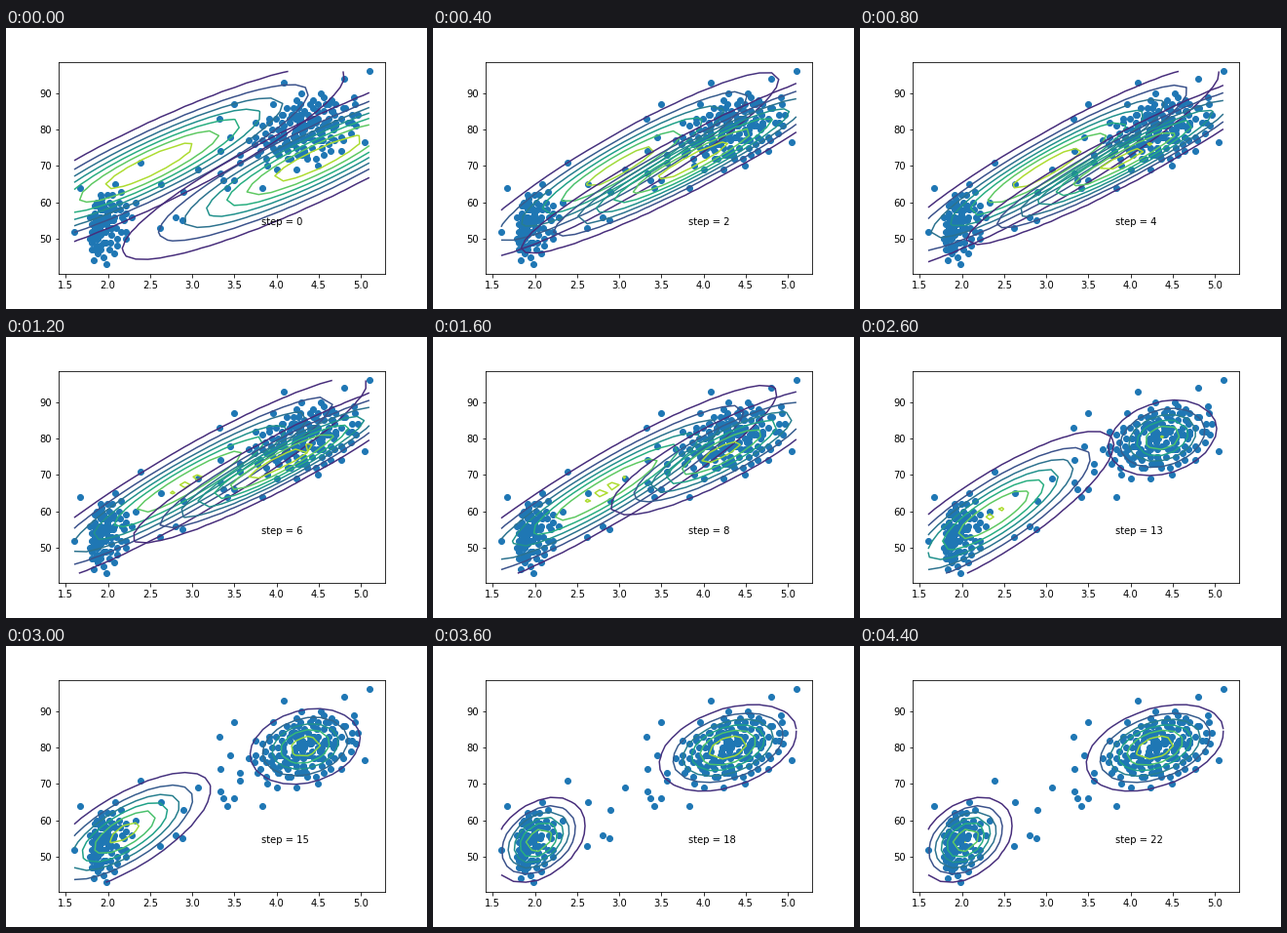
A matplotlib script that plays this animation: 432x288 px, repeating every 4.6 s.

```python
import numpy as np
import matplotlib.pyplot as plt
from matplotlib.animation import FuncAnimation

STEPS = 23
INTERVAL = 200
X_RANGE = (1.6, 5.1)
Y_RANGE = (43, 96)
GOLDEN_ANGLE = np.pi * (3 - np.sqrt(5))

# stray points between and beyond the two clusters
STRAYS = [
    (2.383, 71), (2.617, 53), (2.633, 65), (2.8, 56), (2.883, 55), (2.9, 63),
    (3.067, 69), (3.317, 83), (3.333, 74), (3.333, 68), (3.367, 66),
    (3.417, 64), (3.45, 78), (3.5, 66), (3.5, 87), (3.567, 73), (3.567, 71),
    (3.833, 64), (1.6, 52), (1.667, 64), (1.983, 43), (4.083, 93),
    (4.8, 94), (5.05, 76.5), (5.1, 96),
]

# the fit starts as two equal Gaussians, one unit either side of the data mean
MEAN = np.array([3.488, 70.9])
START = [(*(MEAN + shift), 1.303, 13.98, 184.8) for shift in (-1, 1)]

# key poses by step: (mean x, mean y, var x, cov, var y), left then right
POSES = {
    0: START,
    2: [(3.035, 70.0, 0.912, 11.7, 175), (3.87, 71.4, 1.01, 12.0, 159)],
    6: [(2.966, 68.0, 1.124, 14.5, 214), (4.05, 73.6, 0.748, 8.9, 121)],
    11: [(2.558, 61.9, 0.766, 10.7, 185.5), (4.4, 79.9, 0.108, 0.53, 28.8)],
    15: [(2.2, 56.7, 0.279, 3.25, 72.5), (4.34, 80.3, 0.119, 0.42, 30.3)],
    18: [(2.045, 54.6, 0.075, 0.57, 34.6), (4.29, 79.97, 0.17, 0.94, 36)],
}


def monotone_slopes(t, v):
    d = np.diff(v, axis=0) / np.diff(t)[:, None]
    a, b = d[:-1], d[1:]
    same = a * b > 0
    inner = np.where(same, 2 * a * b / np.where(same, a + b, 1), 0)
    return np.vstack([d[:1], inner, np.zeros_like(d[:1])])


TIMES = np.array(list(POSES), float)
VALUES = np.array([np.ravel(p) for p in POSES.values()])
SLOPES = monotone_slopes(TIMES, VALUES)


def fit(step):
    """Both Gaussians at a step, eased between key poses, then at rest."""
    step = min(step, TIMES[-1])
    k = min(np.searchsorted(TIMES, step, side="right"), len(TIMES) - 1) - 1
    h = TIMES[k + 1] - TIMES[k]
    s = (step - TIMES[k]) / h
    p = ((1 + 2 * s) * (1 - s) ** 2 * VALUES[k]
         + s * (1 - s) ** 2 * h * SLOPES[k]
         + s**2 * (3 - 2 * s) * VALUES[k + 1]
         + s**2 * (s - 1) * h * SLOPES[k + 1])
    return p.reshape(2, 5)


def density(x, y, mx, my, vx, cov, vy):
    det = vx * vy - cov**2
    dx, dy = x - mx, y - my
    q = (vy * dx**2 - 2 * cov * dx * dy + vx * dy**2) / det
    return np.exp(-q / 2) / (2 * np.pi * np.sqrt(det))


def blob(n, rho, reach):
    """Evenly spread normal cloud: a jittered sunflower cut off at reach."""
    i = np.arange(n) + 0.5
    r = np.sqrt(-2 * np.log(1 - i / n * (1 - np.exp(-reach**2 / 2))))
    u = r * np.cos(i * GOLDEN_ANGLE) + rng.normal(0, 0.1, n)
    v = r * np.sin(i * GOLDEN_ANGLE) + rng.normal(0, 0.1, n)
    return u, rho * u + np.sqrt(1 - rho**2) * v


rng = np.random.default_rng(7)
u, v = blob(90, 0.3, 2.0)
short = np.column_stack([1.65 + 0.3 * np.exp(0.45 * u), np.round(54 + 5.4 * v)])
u, v = blob(157, 0.35, 2.0)
long = np.column_stack([4.33 + 0.35 * u, np.round(80 + 5.7 * v)])
points = np.vstack([STRAYS, short, long])

fig, ax = plt.subplots(figsize=(6, 4), dpi=72)
fig.subplots_adjust(left=0.125, right=0.9, bottom=0.125, top=0.88)
ax.scatter(*points.T, color="C0", zorder=1)
ax.set_xlim(1.4153, 5.2847)
ax.set_ylim(40.35, 98.65)
label = ax.text(0.62, 0.23, "", transform=ax.transAxes)

gx, gy = np.meshgrid(np.linspace(*X_RANGE, 25), np.linspace(*Y_RANGE, 25))
contours = []


def draw(step):
    while contours:
        contours.pop().remove()
    for gauss in fit(step):
        z = density(gx, gy, *gauss)
        contours.append(ax.contour(gx, gy, z, zorder=2))
    label.set_text(f"step = {step}")


anim = FuncAnimation(fig, draw, frames=STEPS, interval=INTERVAL,
                     init_func=lambda: draw(0), repeat=True, repeat_delay=0)
plt.show()
```
